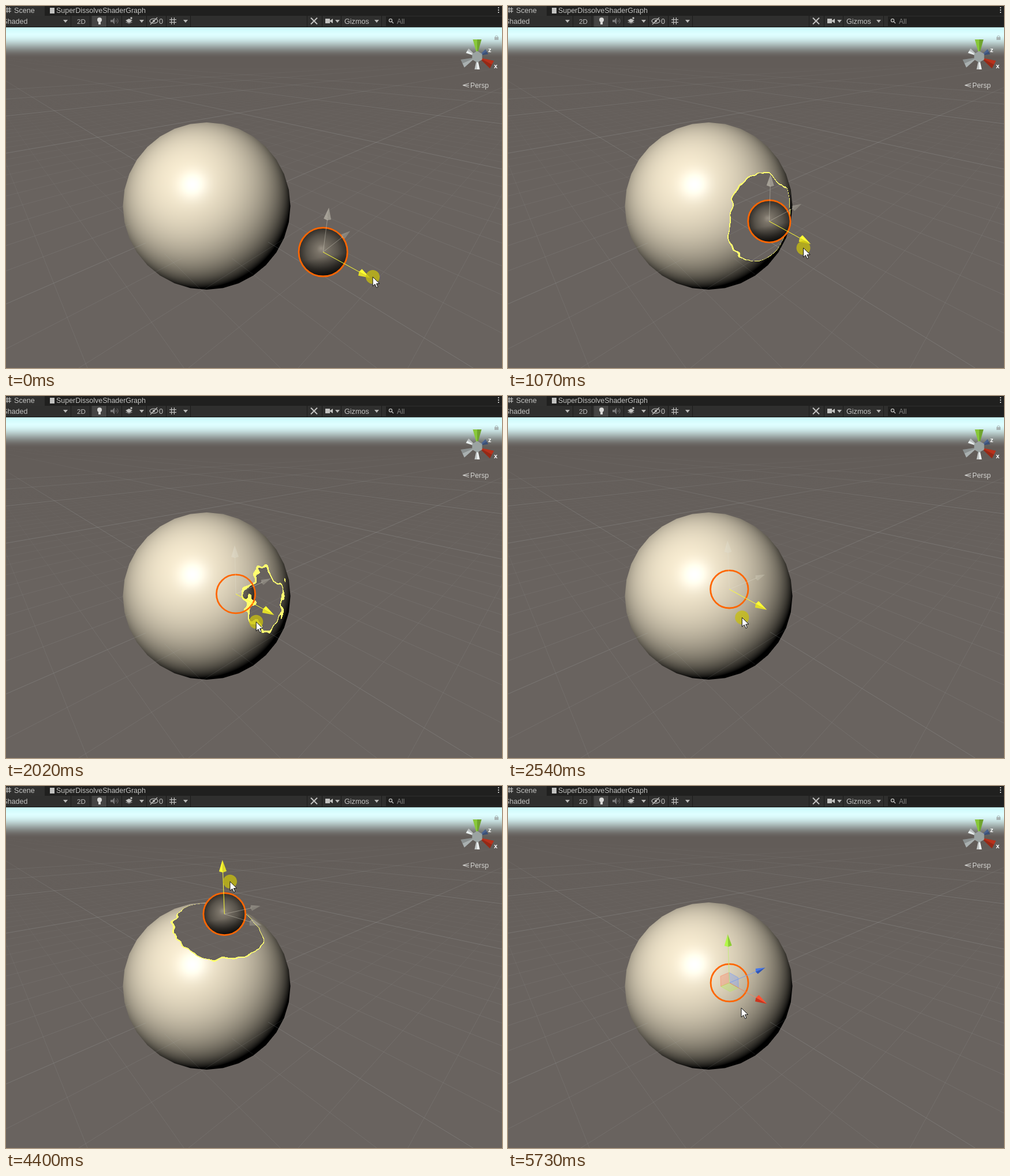
An HTML page with a canvas that plays this animation: 859x628 px, repeating every 5790 ms.

```html
<!DOCTYPE html>
<html lang="en">
<head>
<meta charset="utf-8">
<title>Dissolve scene</title>
<style>
  html, body { margin: 0; width: 100%; height: 100%; overflow: hidden; background: #68605b; }
  canvas { display: block; }
</style>
</head>
<body>
<canvas id="stage" width="859" height="628"></canvas>
<script>
const W = 859, H = 628, LOOP = 5790;
const ctx = document.getElementById('stage').getContext('2d');
const FONT = '"Liberation Sans", Arial, sans-serif';
const SPHERE = { x: 347.5, y: 347, r: 144.6 };
// Vanishing points of the world axes
const VX = { x: -75, y: 84 }, VY = { x: 422, y: 1400 }, VZ = { x: 990, y: 84 };
const YELLOW = '#ffff32', ICON = '#c2c2c0', GAP = '#1c1c1b';

const clamp = v => Math.min(1, Math.max(0, v));
const span = (t, a, b) => clamp((t - a) / (b - a));
const smooth = k => k * k * (3 - 2 * k);
const mix = (a, b, k) => a + (b - a) * k;

// ---- drawing helpers ----
function trace(c, pts) {
  c.beginPath();
  pts.forEach(([x, y], i) => i ? c.lineTo(x, y) : c.moveTo(x, y));
}
function fill(c, pts, color) { trace(c, pts); c.fillStyle = color; c.fill(); }
function line(c, pts, color, width = 1) {
  trace(c, pts); c.strokeStyle = color; c.lineWidth = width; c.stroke();
}
function disc(c, x, y, r, color) {
  c.beginPath(); c.arc(x, y, r, 0, 7); c.fillStyle = color; c.fill();
}
function ring(c, x, y, r, color, width, from = 0, to = 7) {
  c.beginPath(); c.arc(x, y, r, from, to); c.strokeStyle = color; c.lineWidth = width; c.stroke();
}
function rect(c, x, y, w, h, color) { c.fillStyle = color; c.fillRect(x, y, w, h); }
function label(c, s, x, y, size = 12.6, color = ICON) {
  c.font = size + 'px ' + FONT; c.fillStyle = color; c.fillText(s, x, y);
}

// ---- sky and ground ----
function sky(c) {
  const air = [222, 254, 255], soil = [98, 92, 88];
  for (let y = 37; y < H; y++) {
    const haze = smooth(span(y, 48, 90)), near = span(y, 90, 320) * 6.5, top = 14 * span(y, 48, 37);
    const rgb = air.map((v, i) => Math.round(mix(v - top * (i ? .3 : 1.4), soil[i] + near, haze)));
    rect(c, 0, y, W, 1, `rgb(${rgb})`);
  }
}
function fade(c, from, to, alpha) {
  const g = c.createLinearGradient(0, from, 0, to);
  g.addColorStop(0, 'rgba(180,186,186,0)');
  g.addColorStop(1, `rgba(180,186,186,${alpha})`);
  return g;
}
function grid(c) {
  const minor = fade(c, 125, 400, .12), major = fade(c, 86, 200, .21);
  const family = (vp, base, step) => {
    for (let i = -40; i <= 40; i++)
      line(c, [[vp.x, vp.y], [base + i * step, H]], i % 10 ? minor : major);
  };
  family(VX, 809, 167);
  family(VZ, -254, 190);
}

// ---- toolbar ----
function caret(c, x) { fill(c, [[x - 4, 24], [x + 4, 24], [x, 29]], '#b8b8b6'); }
function hash(c, x, y, s) {
  for (const k of [.3, .7]) {
    line(c, [[x + s * k, y], [x + s * k, y + s]], ICON, 1.2);
    line(c, [[x, y + s * k], [x + s, y + s * k]], ICON, 1.2);
  }
}
function cross(c, x, y, r) {
  for (const k of [-1, 1]) line(c, [[x - r, y - r * k], [x + r, y + r * k]], ICON, 2);
}
function speaker(c, x) {
  rect(c, x, 24, 3, 4, '#777');
  fill(c, [[x + 2, 26], [x + 7, 20], [x + 7, 32]], '#777');
  for (const r of [3, 6]) ring(c, x + 7, 26, r, '#777', 1, -.8, .8);
}
function layers(c, x) {
  for (const y of [25, 28]) fill(c, [[x - 6, y], [x, y - 3], [x + 6, y], [x, y + 3]], ICON);
  line(c, [[x - 6, 27], [x, 30], [x + 6, 27]], '#2f2f2e');
  disc(c, x + 4, 21, 1.7, ICON);
}
function hiddenEye(c, x) {
  c.beginPath(); c.ellipse(x, 26, 7, 4, 0, 0, 7);
  c.strokeStyle = ICON; c.lineWidth = 1.2; c.stroke();
  disc(c, x, 26, 2, ICON);
  line(c, [[x - 6, 32], [x + 6, 20]], ICON, 1.3);
}
function toolbar(c) {
  rect(c, 0, 0, W, 17, '#20201f');
  rect(c, 0, 0, 67, 17, '#30302f');
  rect(c, 0, 17, W, 20, '#2f2f2e');
  rect(c, 149, 17, 26, 19, '#454544');
  for (const x of [112, 145, 174, 200, 243, 277, 319, 521, 547, 580, 650]) rect(c, x, 17, 1, 19, GAP);
  rect(c, 0, 36, W, 1, GAP);

  hash(c, -1, 2, 10);
  label(c, 'Scene', 14, 12);
  rect(c, 76, 3, 8, 10, ICON);
  label(c, 'SuperDissolveShaderGraph', 87, 12, 12.45);
  for (const y of [2, 6, 10]) rect(c, 852, y, 2, 2, ICON);

  label(c, 'Shaded', -6, 31);
  label(c, '2D', 123, 31, 11.5);
  disc(c, 162, 24, 4, '#d8d8d6');
  rect(c, 160, 27, 4, 5, '#d8d8d6');
  speaker(c, 181);
  layers(c, 213);
  hiddenEye(c, 256);
  label(c, '0', 265, 31);
  hash(c, 283, 20, 12);
  cross(c, 533.5, 26, 5.5);
  rect(c, 553, 22, 8, 8, ICON);
  fill(c, [[560, 26], [566, 22], [566, 30]], ICON);
  label(c, 'Gizmos', 586, 31);
  for (const x of [103, 235, 311, 574, 642]) caret(c, x);
  rect(c, 658, 18, W, 17, '#1f1f1e');
  ring(c, 666, 25, 2.6, ICON, 1.2);
  line(c, [[668, 27], [671, 30]], ICON, 1.3);
  label(c, 'All', 677, 31, 12, '#868684');
}

// ---- orientation widget ----
function compass(c) {
  const ox = 816, oy = 88;
  const cone = (deg, reach, half, color) => {
    c.save();
    c.translate(ox, oy);
    c.rotate(deg * Math.PI / 180);
    fill(c, [[8, -1.5], [reach, -half], [reach, half], [8, 1.5]], color);
    fill(c, [[8, 0], [reach, 0], [reach, half], [8, 1.5]], 'rgba(0,0,0,.18)');
    c.restore();
  };
  cone(-149, 20, 4.5, '#e8eeee');
  cone(-28, 19, 5, '#4a628f');
  cone(155, 28, 7.5, '#a9b0b0');
  cone(28, 29, 7.5, '#b8321c');
  cone(90, 22, 4.5, '#f0f4f4');
  cone(-90, 30, 7.5, '#88c83a');
  const hex = [...Array(6).keys()].map(i => (i + .5) * Math.PI / 3);
  fill(c, hex.map(a => [ox + 10 * Math.cos(a), oy + 10 * Math.sin(a)]), '#9ba3a2');
  c.font = 'bold 11px ' + FONT; c.fillStyle = '#fff';
  c.fillText('z', 835, 80);
  c.fillText('x', 845, 108);
  rect(c, 846, 54, 7, 5, '#a9b5b5');
  ring(c, 849.5, 54, 2.4, '#a9b5b5', 1, Math.PI, 0);
  for (const d of [-3.5, 0, 3.5]) line(c, [[791, 137.5], [802, 137.5 + d]], '#cfcfcc');
  label(c, 'Persp', 804, 142, 12.3, '#d2d2cf');
}
function makeBackdrop() {
  const cv = document.createElement('canvas');
  cv.width = W; cv.height = H;
  const c = cv.getContext('2d');
  sky(c);
  grid(c);
  toolbar(c);
  compass(c);
  return cv;
}

// ---- large sphere with dissolve ----
const N = 296;
const offX = Math.round(SPHERE.x - N / 2), offY = Math.round(SPHERE.y - N / 2);
const layer = document.createElement('canvas');
layer.width = layer.height = N;
const lctx = layer.getContext('2d');
const base = lctx.createImageData(N, N), out = lctx.createImageData(N, N);
const depth = new Float32Array(N * N), limit = new Float32Array(N * N);

function rnd(x, y, z) {
  const v = Math.sin(x * 127.1 + y * 311.7 + z * 74.7) * 43758.5453;
  return v - Math.floor(v);
}
function noise(x, y, z) {
  const ix = Math.floor(x), iy = Math.floor(y), iz = Math.floor(z);
  const fx = smooth(x - ix), fy = smooth(y - iy), fz = smooth(z - iz);
  const row = (j, k) => mix(rnd(ix, iy + j, iz + k), rnd(ix + 1, iy + j, iz + k), fx);
  return mix(mix(row(0, 0), row(1, 0), fy), mix(row(0, 1), row(1, 1), fy), fz);
}
function buildSphere() {
  const tint = [248, 236, 209], shine = [18, 26, 38], facet = Math.PI / 16;
  for (let j = 0; j < N; j++) for (let i = 0; i < N; i++) {
    const k = j * N + i;
    const dx = i + .5 + offX - SPHERE.x, dy = j + .5 + offY - SPHERE.y;
    const a = ((Math.atan2(dy, dx) % facet) + facet) % facet - facet / 2;
    const rim = (SPHERE.r + .5) * Math.cos(facet / 2) / Math.cos(a);
    const cover = clamp(rim - Math.hypot(dx, dy) + .5);
    if (!cover) continue;
    const x = dx / SPHERE.r, y = dy / SPHERE.r, rr = x * x + y * y;
    const z = Math.sqrt(Math.max(0, 1 - rr));
    // Perspective keeps the normals at the rim tilted towards the viewer.
    const nz = Math.sqrt(Math.max(0, 1 - .92 * rr));
    const lit = Math.max(0, -.25 * x - .317 * y + .91 * nz) ** .8;
    const spec = Math.max(0, -.152 * x - .234 * y + .96 * nz) ** 70;
    for (let n = 0; n < 3; n++) base.data[k * 4 + n] = tint[n] * lit + shine[n] * spec;
    base.data[k * 4 + 3] = cover * 255;
    depth[k] = z;
    limit[k] = .46 + .2 * (.7 * noise(x * 4 + 9, y * 4 + 4, z * 4) + .3 * noise(x * 11, y * 11, z * 11 + 7));
  }
}
function dissolve(ball) {
  out.data.set(base.data);
  const px = out.data, { qx, qy, qz } = ball;
  for (let j = 0; j < N; j++) for (let i = 0; i < N; i++) {
    const k = j * N + i;
    if (!px[k * 4 + 3]) continue;
    const sx = i + .5 + offX, sy = j + .5 + offY;
    const x = (sx - SPHERE.x) / SPHERE.r, y = (sy - SPHERE.y) / SPHERE.r;
    const gap = Math.hypot(x - qx, y - qy, depth[k] - qz) - limit[k];
    const rr = ball.r ** 2 - (sx - ball.x) ** 2 - (sy - ball.y) ** 2;
    const covered = rr > 0 && qz + Math.sqrt(rr) / SPHERE.r > depth[k];
    if (gap < 0 || covered) px[k * 4 + 3] = 0;
    else if (gap < .014) { px[k * 4] = px[k * 4 + 1] = 255; px[k * 4 + 2] = 112; }
  }
  lctx.putImageData(out, 0, 0);
  ctx.drawImage(layer, offX, offY);
}
// The ground cuts the sphere: lines show in front of its lower part.
function frontGrid() {
  ctx.save();
  ctx.beginPath(); ctx.arc(SPHERE.x, SPHERE.y, SPHERE.r, 0, 7); ctx.clip();
  ctx.beginPath(); ctx.rect(0, 378, W, H); ctx.clip();
  ctx.beginPath(); ctx.rect(0, 0, W, H); ctx.ellipse(347, 375, 125, 67, 0, 0, 7); ctx.clip('evenodd');
  grid(ctx);
  ctx.restore();
}

// ---- motion ----
function slideAt(t) { return 2.27 * (1 - span(t, 0, 2540)) ** 1.42; }
function liftAt(t) {
  const p = span(t, 3330, 4750);
  return 1.18 * p ** 1.8 * (1.7 - .7 * p) - 1.225 * smooth(span(t, 4750, 5390));
}
function ballAt(t) {
  const s = slideAt(t), u = liftAt(t), dx = 60.4 * s + 5.6 * s * s;
  return {
    s, u,
    x: 383.3 + dx - 6 * u, y: 335.3 + .552 * dx - 136 * u, r: 32.7 + .057 * dx + 4.5 * u,
    qx: .25 + .46 * s - .1 * u, qy: -.05 + .2 * s - .9 * u, qz: .2 + .49 * s + .5 * u
  };
}
function pointerAt(t, b) {
  const onX = [b.x + 22 + 64 * (b.s / 2.27) ** .7, b.y + 49 - 2.6 * b.s];
  const onY = [b.x - 2 + 14 * b.u, b.y - 73 + 20 * b.u];
  const glide = (from, to, k) => from.map((v, i) => mix(v, to[i], smooth(k)));
  return t < 3300 ? glide(onX, onY, span(t, 2760, 3260)) : glide(onY, [404, 385], span(t, 5400, 5660));
}

// ---- small ball, handles, pointer ----
function drawBall(b) {
  const g = ctx.createRadialGradient(b.x - b.r * .08, b.y - b.r * .15, 0, b.x, b.y, b.r);
  g.addColorStop(0, '#989084');
  g.addColorStop(.2, '#7a7368');
  g.addColorStop(.65, '#57524a');
  g.addColorStop(1, '#302c27');
  disc(ctx, b.x, b.y, b.r, g);
  const d = ctx.createLinearGradient(b.x, b.y + b.r * .2, b.x + b.r * .15, b.y + b.r);
  d.addColorStop(0, 'rgba(0,0,0,0)');
  d.addColorStop(1, 'rgba(0,0,0,.75)');
  disc(ctx, b.x, b.y, b.r, d);
}
function arrow(o, [dx, dy], len, half, [shaft, light, dark]) {
  const d = Math.hypot(dx, dy), ux = dx / d, uy = dy / d;
  const tip = [o.x + dx, o.y + dy], bx = tip[0] - ux * len, by = tip[1] - uy * len;
  const side = k => [bx - uy * half * k, by + ux * half * k];
  const butt = [bx - ux * 2, by - uy * 2];
  line(ctx, [[o.x, o.y], [bx, by]], shaft);
  fill(ctx, [tip, side(-1), butt], light);
  fill(ctx, [tip, side(1), butt], dark);
}
function plane(o, a, b, rgb) {
  const at = (i, j) => [o.x + .24 * (a[0] * i + b[0] * j), o.y + .24 * (a[1] * i + b[1] * j)];
  const quad = [at(0, 0), at(1, 0), at(1, 1), at(0, 1), at(0, 0)];
  fill(ctx, quad, `rgba(${rgb},.32)`);
  line(ctx, quad, `rgba(${rgb},.55)`);
}
function handles(o, active) {
  const dx = 65 + .1 * (o.x - 383), dz = 62 - .09 * (o.x - 383);
  const k = (85 - (o.y - 335) * .08) / Math.hypot(o.x - VY.x, o.y - VY.y);
  const x = [dx, dx * (o.y - VX.y) / (o.x - VX.x)];
  const y = [(o.x - VY.x) * k, (o.y - VY.y) * k];
  const z = [dz, -dz * (o.y - VZ.y) / (VZ.x - o.x)];
  const look = (name, alpha, ...idle) => {
    if (active === name) return [YELLOW, YELLOW, '#e2dc28'];
    return active ? [.4, alpha, alpha * .85].map(v => `rgba(225,222,205,${v})`) : idle;
  };
  if (!active) {
    const back = z.map(v => -v), up = y.map(v => v * .88);
    plane(o, back, up, '255,130,95');
    plane(o, x, up, '110,150,255');
    plane(o, x, back, '180,235,90');
  }
  arrow(o, z, 16, 5, look('z', .3, '#7f9fe8', '#4577ea', '#2d55b8'));
  arrow(o, y, 20, 6.5, look('y', .5, '#c4ee78', '#b4f848', '#8ccc34'));
  arrow(o, x, 20, 6.5, look('x', .3, '#e88a6a', '#ff5233', '#cc341c'));
}
function pointer(x, y) {
  const shape = [[0, 0], [0, 16], [3.8, 12.6], [6.6, 18.6], [9, 17.5], [6.4, 11.8], [11.6, 11.5], [0, 0]];
  const pts = shape.map(([a, b]) => [x + a, y + b]);
  fill(ctx, pts, '#fff');
  line(ctx, pts, '#111');
}

function draw(t) {
  const b = ballAt(t), [mx, my] = pointerAt(t, b);
  const active = t < 2790 ? 'x' : t >= 3230 && t < 5410 ? 'y' : '';
  ctx.drawImage(backdrop, 0, 0);
  drawBall(b);
  dissolve(b);
  frontGrid();
  ring(ctx, b.x, b.y, b.r, '#ff6600', 2.8);
  handles(b, active);
  if (t < 2790 || (t >= 3330 && t < 5400)) disc(ctx, mx, my, 12, 'rgba(200,190,15,.76)');
  pointer(mx, my);
}

buildSphere();
const backdrop = makeBackdrop();
const start = performance.now();
function tick() {
  draw((performance.now() - start) % LOOP);
  requestAnimationFrame(tick);
}
tick();
</script>
</body>
</html>
```
